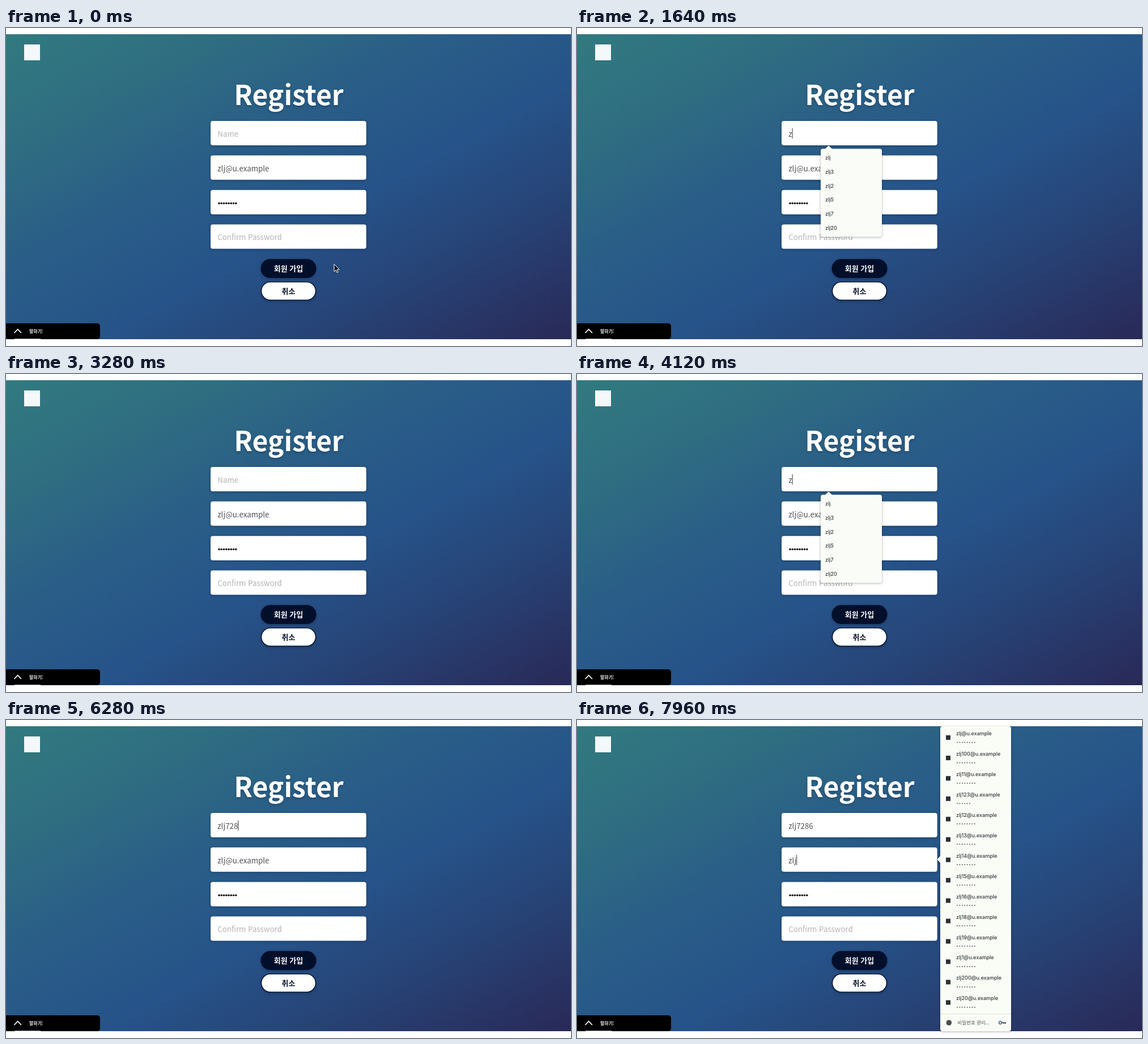
Write an HTML page that moves like this. It is 997 px wide and 561 px high and loops after 8000 ms.

```html
<!DOCTYPE html>
<html lang="ko">
<head>
<meta charset="utf-8">
<title>Register</title>
<style>
  html, body { margin: 0; width: 100%; height: 100%; overflow: hidden; background: #fff; }
  svg { display: block; width: 100%; height: 100%; }
  text { font-family: "Noto Sans CJK KR", "Noto Sans CJK", "Noto Sans", sans-serif; white-space: pre; }
  .title { font-size: 48px; font-weight: 700; fill: #fff; }
  .title, .button { filter: drop-shadow(0 2px 2px rgba(0, 15, 45, .3)); }
  .box { fill: #fff; filter: drop-shadow(0 1px 2px rgba(0, 20, 50, .4)); }
  .value { font-size: 13.3px; font-weight: 300; fill: #4c4f54; }
  .value.hint { fill: #b3b3b3; }
  .label { font-size: 13px; font-weight: 700; text-anchor: middle; }
  .popup { filter: drop-shadow(0 1px 2px rgba(0, 0, 0, .3)); }
  .item { font: 500 9px Inter, "Liberation Sans", sans-serif; fill: #33373b; }
  .note { font-size: 8.5px; fill: #555; }
</style>
</head>
<body>
<svg id="stage" viewBox="0 0 997 561" preserveAspectRatio="none">
  <defs>
    <linearGradient id="sky" x1="0" y1="0" x2="1" y2="1">
      <stop offset="0" stop-color="#317a7f"/>
      <stop offset=".2" stop-color="#2f6d81"/>
      <stop offset=".38" stop-color="#2a5e87"/>
      <stop offset=".58" stop-color="#265389"/>
      <stop offset=".76" stop-color="#274376"/>
      <stop offset="1" stop-color="#292957"/>
    </linearGradient>
  </defs>
  <rect width="997" height="561" fill="#fff"/>
  <rect y="11" width="997" height="538" fill="url(#sky)"/>
  <rect x="32" y="29" width="28" height="28" fill="#f4f8fa"/>
  <text class="title" x="499" y="136" text-anchor="middle">Register</text>

  <g id="form"></g>

  <g class="button">
    <rect x="449.5" y="407.5" width="98" height="33.5" rx="16.7" fill="#020f2b"/>
    <rect x="450.5" y="448" width="96" height="32" rx="16" fill="#fff" stroke="#0a1a3a" stroke-width="1.6"/>
  </g>
  <text class="label" x="498.5" y="429.3" fill="#fff">회원 가입</text>
  <text class="label" x="498.5" y="468.8" fill="#0a142b">취소</text>

  <path d="M0 521H161a5 5 0 0 1 5 5V544a5 5 0 0 1-5 5H0Z" fill="#000"/>
  <path d="M14.5 538l6.2-6.5 6.2 6.5" fill="none" stroke="#fff" stroke-width="1.8"/>
  <text x="41" y="538" font-size="8" font-weight="700" fill="#eee">말하기:</text>
  <rect x="15" y="548" width="46" height="1" fill="#bbb"/>

  <rect id="caret" width="1" height="18" fill="#333"/>
  <g id="names" class="popup"></g>
  <g id="accounts" class="popup"></g>
  <path id="pointer" d="M0 0V13.2L3 10.4 5 15 7 14.1 5.1 9.7H9.2Z" fill="#111" stroke="#fff" stroke-width="1"/>
</svg>
<script>
const LOOP = 8000, BLINK = 500, LEFT = 373.3;
const USER = 'zlj', EMAIL = '@u.example';
const $ = id => document.getElementById(id);

function add(parent, tag, attrs, text = '') {
  const el = document.createElementNS('http://www.w3.org/2000/svg', tag);
  for (const key in attrs) el.setAttribute(key, attrs[key]);
  el.textContent = text;
  parent.append(el);
  return el;
}

function dots(parent, x, y, count, pitch, r, fill) {
  for (let i = 0; i < count; i++) add(parent, 'circle', { cx: x + i * pitch, cy: y, r, fill });
}

const rowY = i => 164 + i * 60.85;
for (let i = 0; i < 4; i++) {
  add($('form'), 'rect', { class: 'box', x: 361, y: rowY(i), width: 274.7, height: 43, rx: 4 });
}
const selection = add($('form'), 'rect', { x: LEFT, y: rowY(1) + 13, height: 18, fill: '#b4d5fe' });
const fields = [0, 1].map(i => add($('form'), 'text', { class: 'value', x: LEFT, y: rowY(i) + 27.8 }));
dots($('form'), 376, 309.2, 8, 4.25, 1.75, '#111');
add($('form'), 'text', { class: 'value hint', x: LEFT, y: rowY(3) + 27.8 }, 'Confirm Password');

// Suggestions for the name field
const panel = add($('names'), 'rect', { x: 430, y: 213, width: 108, rx: 4, fill: '#fafdf7' });
add($('names'), 'path', { d: 'M437.5 213.5L444 207.5 450.5 213.5Z', fill: '#fafdf7' });
const suffixes = ['', '3', '2', '5', '7', '20'];
const items = suffixes.map((_, i) => add($('names'), 'text', { class: 'item', x: 438, y: 232 + i * 24.8 }));

// Saved accounts for the e-mail field
const list = $('accounts');
add(list, 'rect', { x: 641, y: 11, width: 125, height: 538, rx: 4, fill: '#f9fdf6' });
add(list, 'path', { d: 'M641.5 239.5L635.5 246 641.5 252.5Z', fill: '#f9fdf6' });
['', 100, 11, 123, 12, 13, 14, 15, 16, 18, 19, 1, 200, 20].forEach((n, i) => {
  const y = 27 + i * 35.95;
  add(list, 'rect', { x: 651, y: y, width: 8, height: 8, fill: '#2c3038' });
  add(list, 'text', { class: 'item', x: 669, y }, USER + n + EMAIL);
  dots(list, 671, y + 12.5, n === 123 ? 6 : 8, 4.4, 1, '#5a5e62');
});
add(list, 'rect', { x: 641, y: 518, width: 125, height: 1, fill: '#dde0da' });
add(list, 'circle', { cx: 656.3, cy: 534, r: 4.8, fill: '#4a4d50' });
add(list, 'text', { class: 'note', x: 671.5, y: 537 }, '비밀번호 관리...');
add(list, 'circle', { cx: 747, cy: 534, r: 2.4, fill: 'none', stroke: '#3f659c', 'stroke-width': 1.5 });
add(list, 'path', { d: 'M749.5 534H757M753 534v2M756 534v2', fill: 'none', stroke: '#3c4450', 'stroke-width': 1.5 });

// time, focused field (-1 none), name, e-mail, suggestions shown
const full = USER + EMAIL;
const steps = [
  [0, -1, '', full, 0],
  [1160, 0, '', full, 0],
  [1560, 0, 'z', full, 6],
  [1800, 0, 'zl', full, 6],
  [1960, 0, 'zlj', full, 6],
  [2400, 0, 'zl', full, 6],
  [2560, 0, 'z', full, 6],
  [2700, 0, '', full, 0],
  [4040, 0, 'z', full, 6],
  [4760, 0, 'zl', full, 6],
  [4960, 0, 'zlj', full, 6],
  [5640, 0, 'zlj7', full, 1],
  [5840, 0, 'zlj72', full, 0],
  [6120, 0, 'zlj728', full, 0],
  [6520, 0, 'zlj7286', full, 0],
  [6960, 1, 'zlj7286', full, 0],
  [7560, 1, 'zlj7286', 'z', 0],
  [7720, 1, 'zlj7286', 'zl', 0],
  [7820, 1, 'zlj7286', 'zlj', 0]
];

const show = (el, on) => { el.style.display = on ? '' : 'none'; };
const ease = p => p * p * (3 - 2 * p);

function draw(t) {
  const [since, focus, name, email, shown] = steps.findLast(s => s[0] <= t);
  fields[0].textContent = name || 'Name';
  fields[0].classList.toggle('hint', !name);
  fields[1].textContent = email;

  const selected = focus === 1 && email === full;
  show(selection, selected);
  if (selected) selection.setAttribute('width', fields[1].getComputedTextLength());

  const caretOn = focus >= 0 && !selected && (t - since) % (2 * BLINK) < BLINK;
  show($('caret'), caretOn);
  if (caretOn) {
    const typed = focus ? email : name;
    $('caret').setAttribute('x', LEFT + (typed ? fields[focus].getComputedTextLength() : 0));
    $('caret').setAttribute('y', rowY(focus) + 13);
  }

  show($('names'), shown);
  panel.setAttribute('height', 6.5 + shown * 24.8);
  items.forEach((el, i) => {
    el.textContent = USER + (shown === 1 ? '7' : suffixes[i]);
    show(el, i < shown);
  });
  show(list, t >= 7880);

  const p = ease(Math.min(1, Math.max(0, (t - 520) / 560)));
  $('pointer').setAttribute('transform', `translate(${579 - 99 * p} ${416.5 - 229 * p})`);
  show($('pointer'), t < 1560);
}

const start = performance.now();
function tick() {
  draw((performance.now() - start) % LOOP);
  requestAnimationFrame(tick);
}
tick();
</script>
</body>
</html>
```
